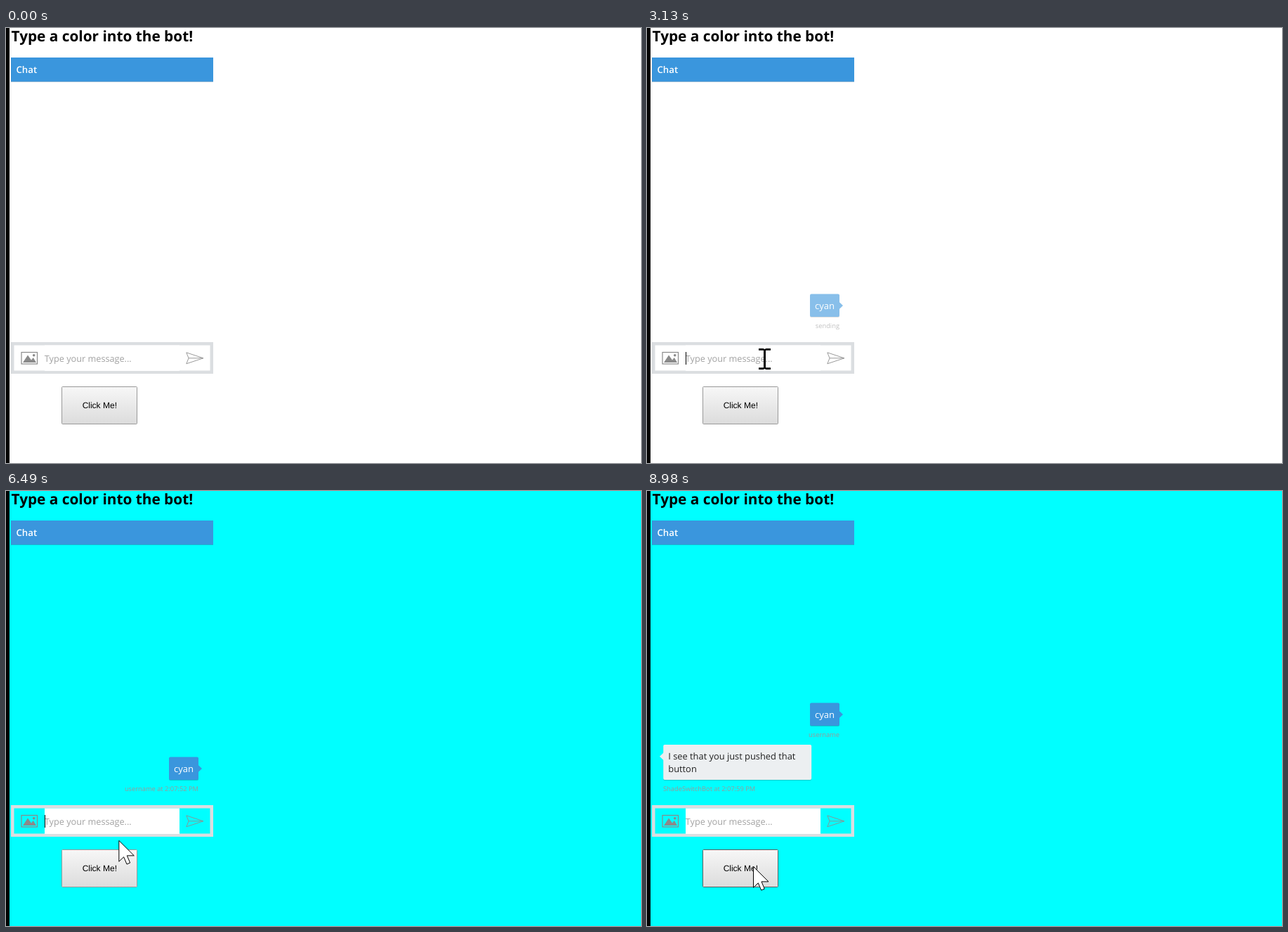
Recreate the animation shown at these times as an HTML page. Size 904 px wide and 619 px high, loop 9.2 s.

```html
<!DOCTYPE html>
<html lang="en">
<head>
<meta charset="utf-8">
<title>Color bot chat</title>
<style>
  html, body { margin: 0; width: 100%; height: 100%; overflow: hidden; background: #fff; }
  svg { display: block; width: 904px; height: 619px; }
  text { font-family: "Open Sans", "Noto Sans", sans-serif; font-size: 12.7px; text-rendering: geometricPrecision; white-space: pre; }
  .title { font-size: 20.8px; font-weight: 700; }
  .head { font-size: 13.2px; font-weight: 600; fill: #fff; }
  .mine { font-size: 13px; fill: #fff; }
  .bot { font-size: 12.85px; fill: #212121; }
  .stamp { font-size: 9.3px; fill: #999; }
  .hint { fill: #a2a2a2; }
  .button { font-family: "Liberation Sans", Arial, sans-serif; font-size: 12px; }
  .shade { fill: #000; fill-opacity: .2; }
  .blue { fill: #3a96dd; }
  .pale { fill: #eceff1; }
</style>
</head>
<body>
<svg viewBox="0 0 904 619">
  <defs>
    <linearGradient id="face" x1="0" y1="0" x2="0" y2="1">
      <stop offset="0" stop-color="#f7f7f7"/>
      <stop offset="1" stop-color="#dcdcdc"/>
    </linearGradient>
  </defs>

  <rect id="page" width="904" height="619"/>
  <rect width="5" height="619"/>
  <text class="title" x="7.5" y="19.3">Type a color into the bot!</text>

  <rect class="shade" x="7" y="43" width="288" height="34"/>
  <rect class="blue" x="7" y="42" width="288" height="34.4"/>
  <text class="head" x="14.5" y="64">Chat</text>

  <g id="mine">
    <rect class="shade" x="232" y="379.5" width="42" height="32.5" rx="2"/>
    <rect class="blue" x="232" y="378.5" width="42" height="32.5" rx="2"/>
    <path class="blue" d="M273 389.3L279 395L273 400.7Z"/>
    <text class="mine" x="239" y="400.3">cyan</text>
    <text class="stamp" id="stamp" x="274" y="426.5" text-anchor="end"></text>
  </g>

  <g id="reply">
    <rect class="shade" x="23.2" y="362" width="211" height="50" rx="2"/>
    <rect class="pale" x="23.2" y="361" width="211" height="50" rx="2"/>
    <path class="pale" d="M24 372L18 377.7L24 383.4Z"/>
    <text class="bot" x="30.3" y="382.3">I see that you just pushed that</text>
    <text class="bot" x="30.3" y="400.3">button</text>
    <text class="stamp" x="23" y="426.5">ShadeSwitchBot at 2:07:59 PM</text>
  </g>

  <rect x="9.25" y="449.25" width="283.5" height="40.5" fill="none" stroke="#dbdee1" stroke-width="4.5"/>
  <rect x="55" y="451.5" width="192" height="36.5" fill="#fff"/>
  <g fill="#8a8a8a">
    <rect x="22" y="461.5" width="22.5" height="16.5" fill="none" stroke="#8a8a8a" stroke-width="1.2"/>
    <path d="M24 476L31 465.5L36 472.5L38.8 469L43 476Z"/>
    <circle cx="39.7" cy="465.8" r="1.8"/>
  </g>
  <path id="send" d="M256.8 461.8L280.8 469.8L256.8 477.8L260 469.8ZM260 469.8H280.8" fill="none" stroke-width=".9"/>
  <text class="hint" id="hint" x="54.8" y="475">Type your message...</text>
  <text id="typed" x="54.8" y="475" fill="#212121"></text>
  <rect id="caret" y="461" width="1" height="18"/>

  <rect id="button" x="79.5" y="510.5" width="107" height="53" rx="1" fill="url(#face)"/>
  <text class="button" x="133.3" y="541" text-anchor="middle">Click Me!</text>

  <path id="beam" d="M-8.5 -15H-2L0 -14L2 -15H8.5V-12.3H1.5V12.3H8.5V15H2L0 14L-2 15H-8.5V12.3H-1.5V-12.3H-8.5Z"/>
  <path id="arrow" d="M0 0V29.8L6.8 23.3L11.2 33.6L15.8 31.6L11.5 21.4H21.5Z" fill="#fff" stroke="#000"/>
</svg>
<script>
const LOOP = 9200;
const WORD = "cyan";
const KEY_TIMES = [2340, 2420, 2570, 2740];
const SENT = 2890, STAMPED = 3600, RECOLOR = 5560, REPLY = 8580;

const el = {};
document.querySelectorAll("svg [id]").forEach(node => el[node.id] = node);

const set = (node, attrs) => {
  for (const name in attrs) node.setAttribute(name, attrs[name]);
};
const show = (node, on) => set(node, { visibility: on ? "visible" : "hidden" });
const mix = (a, b, p) => a + (b - a) * p;
const bend = (a, b, c, p) => mix(mix(a, b, p), mix(b, c, p), p);

// Number of equally spaced ticks passed, the first at start and the last at end.
function ticks(t, start, end, count) {
  if (t < start) return 0;
  return Math.min(count, Math.floor((t - start) / (end - start) * (count - 1) + 1e-6) + 1);
}

function pointerAt(t) {
  if (t < 460) return [416, 530];
  if (t < 1390) {
    const p = ticks(t, 770, 1240, 7) / 7;
    return [bend(347.5, 240, 168.5, p), bend(490, 431, 471, p)];
  }
  const p = Math.min(1, ticks(t, 6190, 7030, 12) / 9);
  const ease = p * p * (3 - 2 * p);
  return [mix(167.5, 151.5, ease), mix(471, 534.5, ease)];
}

function drawPointer(t) {
  const [x, y] = pointerAt(t);
  const overField = x > 55 && x < 247 && y > 451 && y < 488;
  const overButton = x > 79 && x < 187 && y > 510 && y < 564;
  const transform = `translate(${x} ${y})`;
  set(el.beam, { transform });
  set(el.arrow, { transform });
  show(el.beam, t >= 370 && overField);
  show(el.arrow, t >= 370 && !overField);
  set(el.button, { stroke: overButton ? "#5e5e5e" : "#999" });
}

function drawInput(t) {
  const count = t < SENT ? KEY_TIMES.filter(k => t >= k).length : 0;
  el.typed.textContent = WORD.slice(0, count);
  const width = count ? el.typed.getComputedTextLength() : 0;
  set(el.caret, { x: Math.round(55 + width) });
  show(el.caret, t >= KEY_TIMES[0] && t < 6880);
  show(el.hint, !count);
  set(el.send, { stroke: count ? "#3a96dd" : "#8f8f8f" });
}

function drawMessages(t) {
  const fade = ticks(t, SENT, 3220, 5) / 5;
  set(el.mine, {
    opacity: fade,
    transform: `translate(0 ${t >= REPLY ? -77 : 0})`
  });
  el.stamp.textContent = t < STAMPED ? "sending" : t < REPLY ? "username at 2:07:52 PM" : "username";

  const step = ticks(t, REPLY, 8730, 3) + ticks(t, 8880, 8980, 3);
  set(el.reply, { opacity: step < 2 ? step * .02 : step / 6 });
}

function draw(t) {
  set(el.page, { fill: t < RECOLOR ? "#fff" : "#0ff" });
  drawMessages(t);
  drawInput(t);
  drawPointer(t);
}

const start = performance.now();
function frame() {
  draw((performance.now() - start) % LOOP);
  requestAnimationFrame(frame);
}
frame();
</script>
</body>
</html>
```
